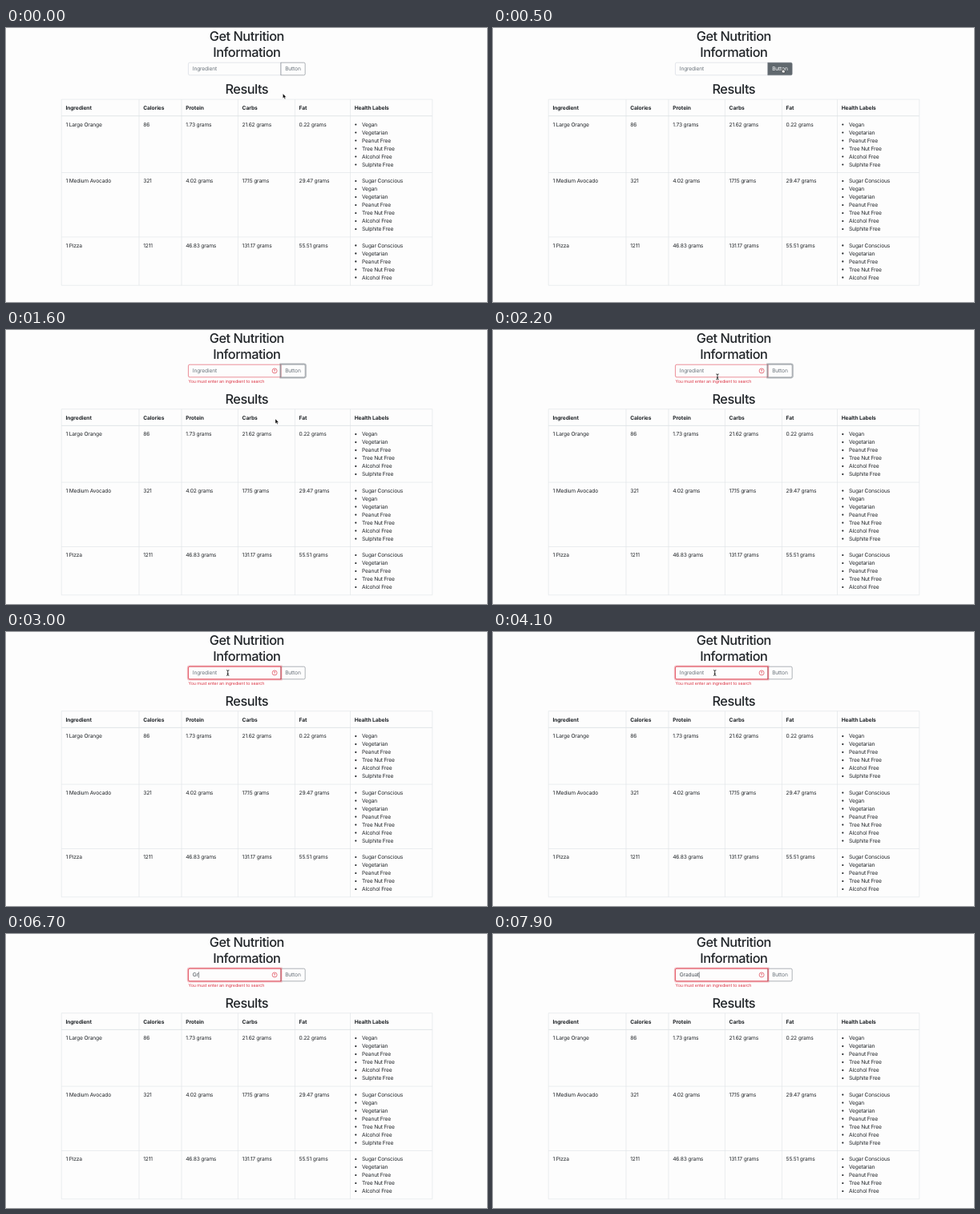
Animation of 600 by 342 pixels, one loop 8 s. Source, as an HTML page:

```html
<!DOCTYPE html>
<html lang="en">
<head>
<meta charset="utf-8">
<title>Get Nutrition Information</title>
<style>
  html, body { margin: 0; width: 100%; height: 100%; overflow: hidden; background: #fdfdfd; }
  svg { display: block; width: 100vw; height: 100vh; }
  text { font: 400 6.67px Inter, "Open Sans", sans-serif; letter-spacing: -.024em; fill: #212529;
         text-rendering: geometricPrecision; white-space: pre; }
  .title { font-size: 16.3px; font-weight: 500; letter-spacing: -.028em; text-anchor: middle; }
  .head { font-weight: 700; letter-spacing: -.014em; }
  .feedback { font-size: 5.33px; letter-spacing: -.012em; fill: #dc3545; }
  .line { fill: none; stroke: #dee2e6; stroke-width: .6; }
  .edge { fill: none; stroke-width: .55; }
  .ring { fill: none; stroke-width: 1.4; }
</style>
</head>
<body>
<svg viewBox="0 0 600 342">
  <text class="title" x="300.3" y="16">Get Nutrition</text>
  <text class="title" x="300.3" y="36">Information</text>

  <path id="input" class="edge" d="M343 43.2H229.1a1.67 1.67 0 0 0-1.67 1.67V57.2a1.67 1.67 0 0 0 1.67 1.67H343z"/>
  <text id="value" x="232.8" y="53.4"></text>

  <path id="ring" class="ring" stroke="#6c757d" d="M342 42.3H371.7a2.4 2.4 0 0 1 2.4 2.4V57.4a2.4 2.4 0 0 1-2.4 2.4H342z"/>
  <path id="fill" fill="#60686e" d="M342.8 43.2H371.5a1.67 1.67 0 0 1 1.67 1.67V57.2a1.67 1.67 0 0 1-1.67 1.67H342.8z"/>
  <path class="edge" stroke="#6c757d" d="M342.8 43.2H371.5a1.67 1.67 0 0 1 1.67 1.67V57.2a1.67 1.67 0 0 1-1.67 1.67H342.8z"/>
  <text id="label" x="357.9" y="53.4" text-anchor="middle">Button</text>

  <g id="focus" fill="none" stroke="#dc3545">
    <path class="ring" stroke-opacity=".28" d="M343.8 42.3H228.9a2.4 2.4 0 0 0-2.4 2.4V57.4a2.4 2.4 0 0 0 2.4 2.4H343.8z"/>
    <path class="edge" d="M343 43.2H229.1a1.67 1.67 0 0 0-1.67 1.67V57.2a1.67 1.67 0 0 0 1.67 1.67H343z"/>
  </g>
  <rect id="caret" y="47.3" width=".6" height="7.4" fill="#343a40"/>

  <g id="error">
    <circle cx="335.1" cy="51" r="3" fill="none" stroke="#dc3545" stroke-width=".65"/>
    <path d="M334.7 49.4h.8l-.2 1.9h-.4z" fill="#dc3545" stroke="#dc3545" stroke-width=".25"/>
    <circle cx="335.1" cy="52.4" r=".42" fill="#dc3545"/>
    <text class="feedback" x="227.5" y="66.3">You must enter an ingredient to search</text>
  </g>

  <g id="results"></g>

  <g id="cursor">
    <path id="arrow" d="M0 0V5.8L1.35 4.6 2.2 6.6 3.2 6.15 2.35 4.2H4.1z" fill="#000" stroke="#fff" stroke-width=".35"/>
    <path id="hand" d="M-.7-.4Q0-1 .45-.2L.8 1.5Q1.4 1 1.7 1.6 2.3 1.2 2.6 1.9 3.3 1.7 3.3 2.5L2.9 4.6H.3L-1.2 2.7Q-1.3 1.9-.3 2.3z"
          fill="#fff" stroke="#111" stroke-width=".5"/>
    <g id="beam" fill="none" stroke-linecap="round">
      <path d="M-1.3-3.3Q0-3.3 0-2.5 0-3.3 1.3-3.3M0-2.5V2.5M-1.3 3.3Q0 3.3 0 2.5 0 3.3 1.3 3.3M-.7 1H.7" stroke="#fff" stroke-width="1.3"/>
      <path d="M-1.3-3.3Q0-3.3 0-2.5 0-3.3 1.3-3.3M0-2.5V2.5M-1.3 3.3Q0 3.3 0 2.5 0 3.3 1.3 3.3M-.7 1H.7" stroke="#000" stroke-width=".75"/>
    </g>
  </g>
</svg>
<script>
const LOOP = 8000, STEP = 100;
const $ = id => document.getElementById(id);

const columns = [69.2, 166, 219, 289.4, 360.4, 429.5, 531.8];
const headings = ["Ingredient", "Calories", "Protein", "Carbs", "Fat", "Health Labels"];
const foods = [
  { y: 110, cells: ["1 Large Orange", "86", "1.73 grams", "21.62 grams", "0.22 grams"],
    labels: ["Vegan", "Vegetarian", "Peanut Free", "Tree Nut Free", "Alcohol Free", "Sulphite Free"] },
  { y: 180.5, cells: ["1 Medium Avocado", "321", "4.02 grams", "17.15 grams", "29.47 grams"],
    labels: ["Sugar Conscious", "Vegan", "Vegetarian", "Peanut Free", "Tree Nut Free", "Alcohol Free", "Sulphite Free"] },
  { y: 260.9, cells: ["1 Pizza", "1211", "46.83 grams", "131.17 grams", "55.51 grams"],
    labels: ["Sugar Conscious", "Vegetarian", "Peanut Free", "Tree Nut Free", "Alcohol Free"] }
];

function buildResults() {
  const text = (x, y, s, cls = "") => `<text class="${cls}" x="${x}" y="${y}">${s}</text>`;
  const top = 89.1, bottom = 321.2;
  let out = text(300.3, 82, "Results", "title");
  out += `<path class="line" d="${columns.map(x => `M${x} ${top}V${bottom}`).join("")}"/>`;
  out += `<path class="line" d="${[top, 180.5, 260.9, bottom].map(y => `M69.2 ${y}H531.8`).join("")}"/>`;
  out += `<path class="line" style="stroke-width:.9" d="M69.2 109.8H531.8"/>`;
  headings.forEach((s, i) => out += text(columns[i] + 5.2, 102, s, "head"));
  for (const { y, cells, labels } of foods) {
    cells.forEach((s, i) => out += text(columns[i] + 5.2, y + 12.8, s));
    labels.forEach((s, i) => {
      const base = y + 12.8 + i * 10;
      out += `<circle cx="436.3" cy="${base - 2.3}" r="1.1" fill="#212529"/>` + text(444, base, s);
    });
  }
  $("results").innerHTML = out;
}

// [time, x, y, shape]
const path = [
  [0, 345.4, 82, "arrow"], [100, 345.4, 82, "arrow"], [200, 349, 75, "arrow"], [300, 356, 61, "arrow"],
  [400, 360.5, 52.5, "hand"], [500, 361, 51.3, "hand"], [1400, 361, 51.3, "hand"],
  [1500, 354, 78, "arrow"], [1600, 336, 111, "arrow"], [1700, 316, 92, "arrow"],
  [1800, 296, 46, "beam"], [1900, 283, 12, "beam"], [2000, 283, 12, "beam"],
  [2100, 282, 38, "beam"], [2200, 280, 58.3, "beam"], [2300, 278, 54, "beam"], [2400, 276.7, 51, "beam"]
];
const typing = [[6500, "G"], [6700, "Gr"], [7000, "Gre"], [7300, "Gr"], [7400, "Gra"],
  [7500, "Grad"], [7600, "Gradu"], [7700, "Gradua"], [7900, "Graduat"]];
const caretToggles = [2500, 3000, 3500, 4100, 4600, 5100, 5500, 6100, 6500];

const latest = (keys, t) => keys.filter(k => k[0] <= t).pop();
const ramp = (t, from, to) => Math.min(1, Math.max(0, (t - from) / (to - from)));
const show = (id, on) => $(id).style.display = on ? "" : "none";

function render(t) {
  const invalid = t >= 1000;
  const focus = ramp(t, 2400, 2600);
  const hover = ramp(t, 300, 500) * (1 - ramp(t, 1400, 1600));
  const typed = latest(typing, t)?.[1];

  $("results").setAttribute("transform", `translate(0 ${invalid ? 9.6 : 0})`);
  show("error", invalid);
  $("input").style.stroke = invalid ? "#dc3545" : "#ced4da";
  $("focus").style.opacity = focus;
  $("ring").style.opacity = invalid ? .5 * (1 - focus) : 0;
  $("fill").style.opacity = hover;
  $("label").style.fill = hover > .5 ? "#fff" : "#6c757d";

  $("value").textContent = typed ?? "Ingredient";
  $("value").style.fill = typed ? "#495057" : "#6c757d";
  show("caret", caretToggles.filter(k => k <= t).length % 2);
  $("caret").setAttribute("x", 232.8 + (typed ? $("value").getComputedTextLength() : 0));

  const [, x, y, shape] = latest(path, t);
  $("cursor").setAttribute("transform", `translate(${x} ${y})`);
  show("cursor", !typed);
  for (const id of ["arrow", "hand", "beam"]) show(id, id === shape);
}

function tick() {
  render(Math.floor(performance.now() % LOOP / STEP) * STEP);
  requestAnimationFrame(tick);
}

buildResults();
tick();
</script>
</body>
</html>
```
